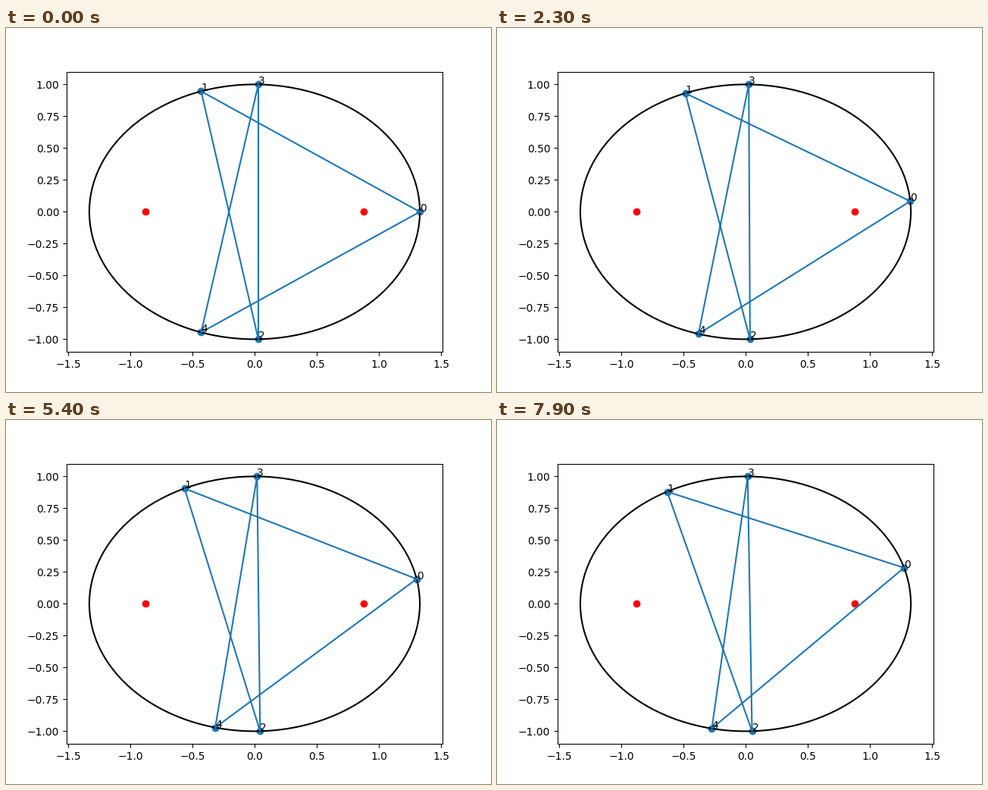
A matplotlib script for the animation above (8000 ms loop, 640 by 480 pixels).

```python
import numpy as np
import matplotlib.pyplot as plt
from matplotlib.animation import FuncAnimation

A, B = 1.33, 1.0
FOCUS = np.sqrt(A**2 - B**2)
FRAMES, INTERVAL = 80, 100


def on_ellipse(angle):
    return A * np.cos(angle), B * np.sin(angle)


def side(t):
    return 108.87 + 0.1047 * t + 0.00019 * t**2


def pole(t):
    return 88.69 + 0.0095 * t - 0.000029 * t**2


def vertices(t):
    """Corners of the star; the lower ones mirror the upper ones in time."""
    angles = [0.208 * t, side(t), -pole(-t), pole(t), -side(-t)]
    return np.column_stack(on_ellipse(np.radians(angles)))


fig, ax = plt.subplots(figsize=(6.4, 4.8), dpi=100)
ax.set_xlim(-1.5125, 1.5125)
ax.set_ylim(-1.1, 1.1)

ax.plot(*on_ellipse(np.linspace(0, 2 * np.pi, 400)), color="black")
ax.scatter([-FOCUS, FOCUS], [0, 0], color="red")

start = vertices(0)
star, = ax.plot([], [], color="C0")
dots = ax.scatter(*start.T, color="C0")
labels = [ax.text(x, y, str(i)) for i, (x, y) in enumerate(start)]


def update(t):
    pts = vertices(t)
    star.set_data(*np.vstack([pts, pts[:1]]).T)
    dots.set_offsets(pts)
    for label, point in zip(labels, pts):
        label.set_position(point)
    return [star, dots, *labels]


anim = FuncAnimation(fig, update, frames=FRAMES, interval=INTERVAL,
                     repeat=True, repeat_delay=0)
plt.show()
```
